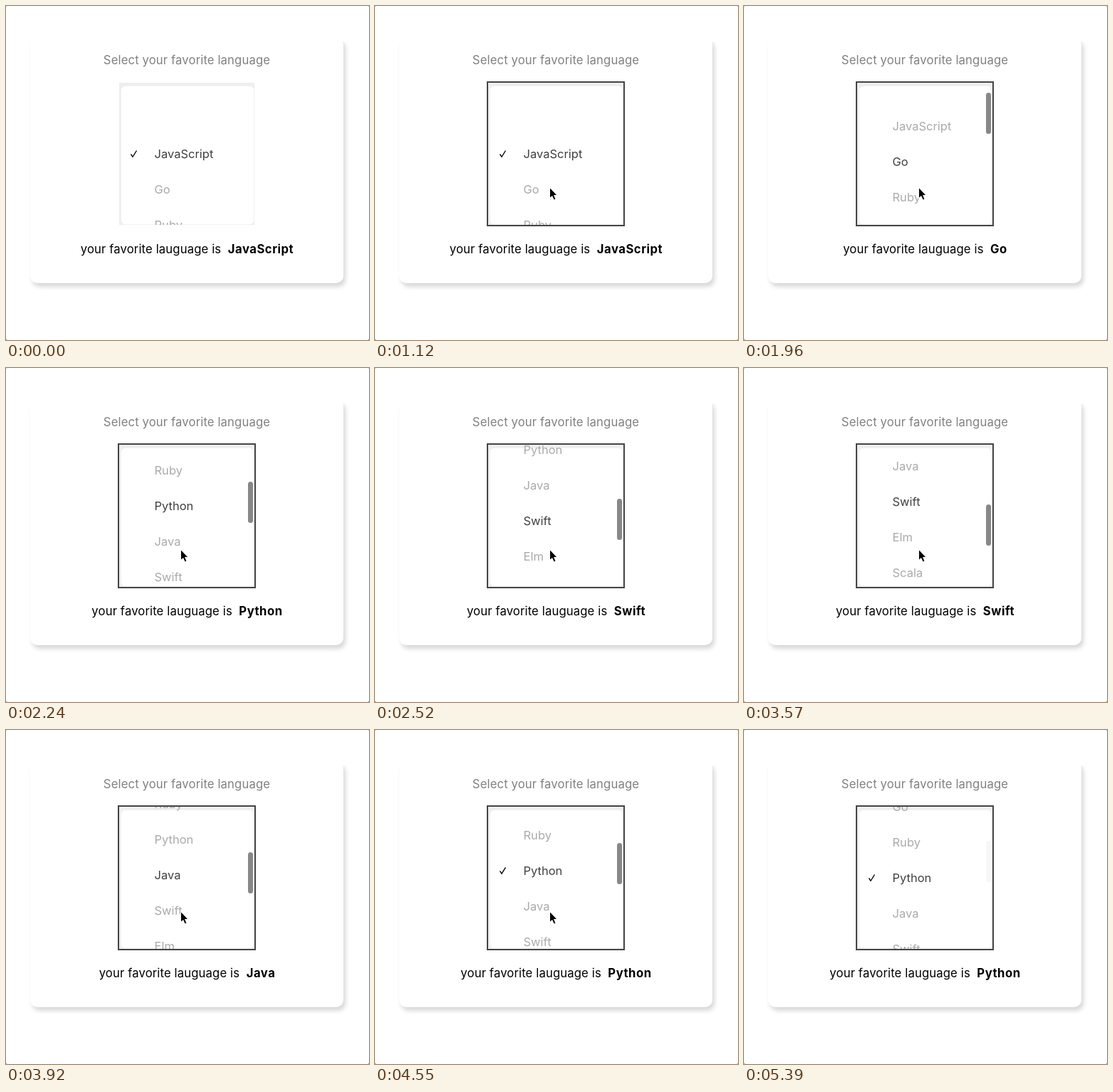
An HTML page for the animation above (5.88 s loop, 510 px wide and 470 px high).

```html
<!DOCTYPE html>
<html lang="en">
<meta charset="utf-8">
<title>Language picker</title>
<style>
  html, body { margin: 0; width: 100%; height: 100%; overflow: hidden; background: #666; }
  body { font: 16.7px/50px Inter, sans-serif; letter-spacing: .12px; color: #000; }
  div, svg { position: absolute; }
  #stage { width: 510px; height: 470px; overflow: hidden; background: #fff; border-radius: 2px; }
  #card { left: 34px; top: 44px; width: 440px; height: 346px; background: #fff;
    border-radius: 10px; box-shadow: 3px 5px 6px rgba(0, 0, 0, .16); }
  #cover { width: 510px; height: 50px; background: #fff; }
  .line { left: 0; width: 508px; text-align: center; white-space: nowrap; }
  #title { top: 51px; color: #808080; }
  #result { top: 317px; width: 509px; }
  #result b { margin-left: 9.5px; letter-spacing: .5px; }
  #picker { left: 159px; top: 108px; width: 190px; height: 200px; overflow: hidden; background: #eee; }
  #well { left: 3px; top: 5px; width: 186px; height: 194px; background: #fff;
    border-radius: 6px; box-shadow: 0 0 2px #fff; }
  #list { left: 0; top: 75px; }
  .item { left: 49.5px; color: #aaa; font-size: 16.5px; letter-spacing: 0; }
  .item.on { color: #404040; }
  #check { left: 15px; }
  #thumb { left: 181px; width: 7px; height: 58px; border-radius: 4px; background: #888; }
  #focus { left: 157px; top: 106px; width: 190px; height: 200px; border: 2px solid #444; }
  svg { fill: none; overflow: visible; }
</style>
<div id="stage">
  <div id="card"></div>
  <div id="cover"></div>
  <div class="line" id="title">Select your favorite language</div>
  <div id="picker">
    <div id="well"></div>
    <div id="list">
      <svg id="check" width="11" height="50"><path d="M1.5 25.5L4 29.3 9.5 20.5" stroke="#000" stroke-width="1.4"/></svg>
    </div>
    <div id="thumb"></div>
  </div>
  <div id="focus"></div>
  <div class="line" id="result">your favorite lauguage is<b id="choice"></b></div>
  <svg id="cursor" width="12" height="18">
    <path d="M0 0V13L3 10.4 5.6 15.9 7.4 15.1 5 9.6H9Z" fill="#000" stroke="#fff" stroke-width="1.6" paint-order="stroke"/>
  </svg>
</div>
<script>
const LOOP = 5880, STEP = 70, ROW = 50;
const languages = ['JavaScript', 'Go', 'Ruby', 'Python', 'Java', 'Swift', 'Elm', 'Scala', 'Kotlin'];
const el = id => document.getElementById(id);
const [list, check, thumb, focusRing, choice, cursor] =
  ['list', 'check', 'thumb', 'focus', 'choice', 'cursor'].map(el);

const items = languages.map((name, i) => {
  const item = document.createElement('div');
  item.className = 'item';
  item.textContent = name;
  item.style.top = i * ROW + 'px';
  return list.appendChild(item);
});

const progress = (t, from, to) => Math.min(1, Math.max(0, (t - from) / (to - from)));
const easeOut = (x, power) => 1 - (1 - x) ** power;
const show = (node, visible) => node.style.visibility = visible ? 'visible' : 'hidden';

// Fling down, fling back up, then snap to the nearest row.
const scrollAt = t =>
  300 * easeOut(progress(t, 1890, 3220), 2.6)
  - 122 * easeOut(progress(t, 3430, 4130), 1.27)
  - 28 * progress(t, 4270, 4620) ** 2;

// A row is picked as soon as it comes within 35px of the middle.
const pickedAt = (t, scroll) => t < 3430
  ? Math.floor((scroll + 35) / ROW)
  : Math.ceil((scroll - 35) / ROW);

function draw(t) {
  const scroll = scrollAt(t), picked = pickedAt(t, scroll);
  list.style.transform = `translateY(${-scroll}px)`;
  items.forEach((item, i) => item.classList.toggle('on', i === picked));
  choice.textContent = languages[picked];

  check.style.top = picked * ROW + 'px';
  show(check, t < 1960 || (t >= 3220 && t < 3500) || t >= 4340);
  show(focusRing, t >= 1120);

  thumb.style.top = 2 + scroll * .305 + 'px';
  thumb.style.opacity = 1 - .93 * progress(t, 5110, 5390);
  show(thumb, t >= 1960);

  const enter = 1 - easeOut(progress(t, 70, 350), 2);
  const leave = progress(t, 4900, 5320) ** 2;
  cursor.style.transform =
    `translate(${246 + 6 * enter - 4 * leave}px, ${256.5 + 160 * enter + 216 * leave}px)`;
  show(cursor, t >= 70 && t < 5390);
}

const start = performance.now();
function tick() {
  const t = (performance.now() - start) % LOOP;
  draw(Math.floor(t / STEP) * STEP);
  requestAnimationFrame(tick);
}
tick();
</script>
</html>
```
